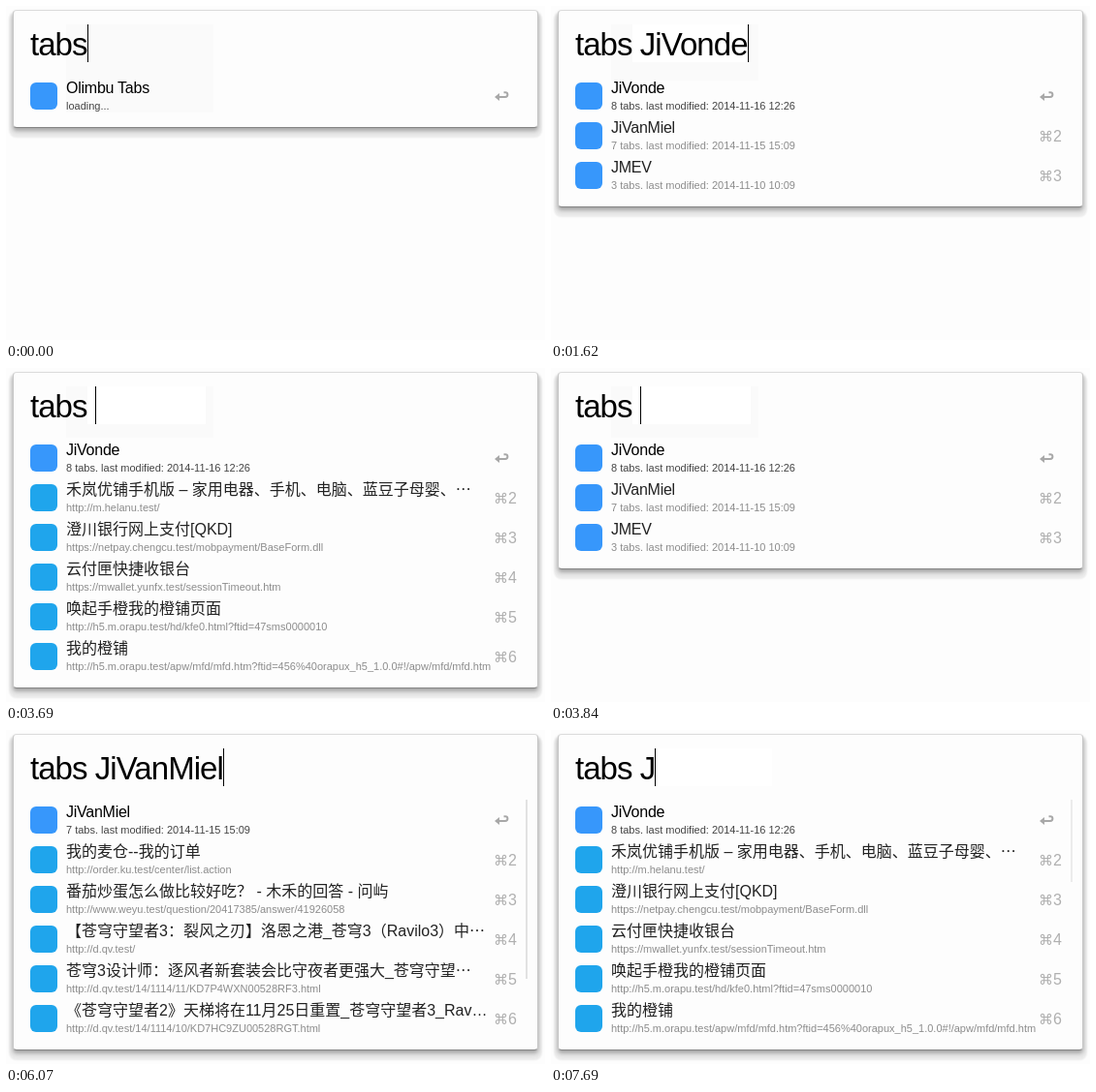
Animation of 556x345 px, one loop 8000 ms. Source, as an HTML page:

```html
<!DOCTYPE html>
<html lang="zh-CN">
<head>
<meta charset="utf-8">
<title>Tab launcher</title>
<style>
html, body { margin: 0; width: 100%; height: 100%; overflow: hidden; background: #fdfdfd; }
#stage {
  position: relative; width: 556px; height: 345px; overflow: hidden;
  font-family: "Liberation Sans", "Noto Sans CJK SC", "Noto Sans CJK", sans-serif;
}
#stage div { position: absolute; box-sizing: border-box; white-space: pre; }
#panel {
  left: 7px; top: 4px; width: 542px; border: 1px solid #c8c8c8;
  border-top-color: #dcdcdc; border-bottom-color: #858585; border-radius: 4px; background: #fdfdfd;
  box-shadow: 0 3px 4px rgba(0,0,0,.3), 0 6px 2px 4px rgba(0,0,0,.08);
}
#wash { left: 62px; top: 19px; width: 152px; background: #fafafa; }
#patch { top: 19px; height: 39px; background: #fff; }
#band { left: 18px; top: 73px; width: 520px; height: 81px; background: #f7f7f7; }
#query {
  left: 25px; top: 19px; height: 39px; line-height: 42px;
  font-size: 33px; letter-spacing: -.95px; color: #000;
}
#caret { display: inline-block; width: 1px; height: 39px; vertical-align: top; background: #000; }
#bar { left: 536px; top: 72px; width: 2px; background: #e2e2e2; }
.row { left: 0; width: 556px; height: 41px; }
.icon { left: 25px; top: 6px; width: 28px; height: 28px; border-radius: 6px; background: #1fa5ec; }
.icon.device { background: #3797fb; }
.name { left: 62px; top: 1.5px; line-height: 20px; font-size: 16px; color: #222; }
.device + .name { letter-spacing: -.25px; }
.note { left: 62px; top: 23px; line-height: 14px; font-size: 11px; color: #8c8c8c; }
.key { left: 503px; top: 11px; font-size: 16px; line-height: 20px; color: #b0b0b0; }
.key i { font: normal 15px/20px "DejaVu Sans", sans-serif; }
.row svg { position: absolute; left: 503px; top: 14px; display: none; }
.on .name { color: #000; }
.on .note { color: #444; }
.on .key { display: none; }
.on svg { display: block; }
</style>
</head>
<body>
<div id="stage">
  <div id="panel"></div>
  <div id="wash"></div>
  <div id="patch"></div>
  <div id="band"></div>
  <div id="query"><span id="text"></span><span id="caret"></span></div>
  <div id="rows"></div>
  <div id="bar"></div>
</div>
<script>
const LOOP = 8000;
const $ = id => document.getElementById(id);

const device = (name, note) => ({ name, note, device: true });
const page = (name, note) => ({ name, note });

const phone = device('JiVonde', '8 tabs. last modified: 2014-11-16 12:26');
const tablet = device('JiVanMiel', '7 tabs. last modified: 2014-11-15 15:09');
const laptop = device('JMEV', '3 tabs. last modified: 2014-11-10 10:09');

const lists = {
  loading: [device('Olimbu Tabs', 'loading...')],
  devices: [phone, tablet, laptop],
  phone: [
    phone,
    page('禾岚优铺手机版 – 家用电器、手机、电脑、蓝豆子母婴、⋯', 'http://m.helanu.test/'),
    page('澄川银行网上支付[QKD]', 'https://netpay.chengcu.test/mobpayment/BaseForm.dll'),
    page('云付匣快捷收银台', 'https://mwallet.yunfx.test/sessionTimeout.htm'),
    page('唤起手橙我的橙铺页面', 'http://h5.m.orapu.test/hd/kfe0.html?ftid=47sms0000010'),
    page('我的橙铺', 'http://h5.m.orapu.test/apw/mfd/mfd.htm?ftid=456%40orapux_h5_1.0.0#!/apw/mfd/mfd.htm')
  ],
  tablet: [
    tablet,
    page('我的麦仓--我的订单', 'http://order.ku.test/center/list.action'),
    page('番茄炒蛋怎么做比较好吃？ - 木禾的回答 - 问屿', 'http://www.weyu.test/question/20417385/answer/41926058'),
    page('【苍穹守望者3：裂风之刃】洛恩之港_苍穹3（Ravilo3）中⋯', 'http://d.qv.test/'),
    page('苍穹3设计师：逐风者新套装会比守夜者更强大_苍穹守望⋯', 'http://d.qv.test/14/1114/11/KD7P4WXN00528RF3.html'),
    page('《苍穹守望者2》天梯将在11月25日重置_苍穹守望者3_Rav…', 'http://d.qv.test/14/1114/10/KD7HC9ZU00528RGT.html')
  ]
};

// Each step changes part of the state from its time on.
const steps = [
  [0, { word: '', list: 'loading', sel: 0, caret: 1, bar: 0, fade: 1, wash: 91, patch: null }],
  [140, { list: 'devices', wash: 58 }],
  [580, { caret: 0 }],
  [1180, { caret: 1 }],
  [1620, { word: ' JiVonde', patch: [84, 206] }],
  [1770, { list: 'phone', bar: 165, wash: 53 }],
  [2220, { caret: 0 }],
  [2520, { caret: 1 }],
  ...erase(' JiVonde', [2520, 2660, 2810, 2960, 3100, 3250]),
  [3400, { fade: .5 }],
  [3540, { fade: 0 }],
  [3690, { word: ' ' }],
  [3840, { list: 'devices', bar: 0 }],
  [4290, { caret: 0 }],
  [4440, { sel: 1 }],
  [4880, { caret: 1 }],
  [5030, { word: ' JiVanMiel', list: 'tablet', sel: 0, bar: 185, fade: 1, wash: 0, patch: null }],
  [5470, { caret: 0 }],
  [6070, { caret: 1 }],
  [6220, { patch: [109, 228] }],
  ...erase(' JiVanMiel', [6220, 6370, 6510, 6800, 6950, 7100, 7250, 7400]),
  [6800, { fade: .5 }],
  [6950, { fade: 0 }],
  [7540, { list: 'phone', bar: 85, fade: 1 }],
  [7690, { fade: .6 }]
].sort((a, b) => a[0] - b[0]);

function erase(word, times) {
  return times.map((t, i) => [t, { word: word.slice(0, -1 - i) }]);
}

function add(parent, cls, text = '') {
  const el = document.createElement('div');
  el.className = cls;
  el.textContent = text;
  return parent.appendChild(el);
}

const arrow = `<svg width="16" height="13" fill="none" stroke="#a8a8a8" stroke-width="2">
<path d="M4 7H12A2.4 2.4 0 0 0 12 2.2H10.5"/><path d="M6 3V11L1 7Z" fill="#a8a8a8" stroke="none"/></svg>`;

function buildRow(box, item, i) {
  const row = add(box, 'row');
  row.style.top = 73 + 41 * i + 'px';
  add(row, item.device ? 'icon device' : 'icon');
  add(row, 'name', item.name);
  add(row, 'note', item.note);
  add(row, 'key').innerHTML = `<i>⌘</i>${i + 1}`;
  row.insertAdjacentHTML('beforeend', arrow);
  return row;
}

const views = {};
for (const id in lists) {
  const box = add($('rows'), 'list');
  views[id] = { box, rows: lists[id].map((item, i) => buildRow(box, item, i)) };
}

function show(s) {
  $('text').textContent = 'tabs' + s.word;
  $('caret').style.opacity = s.caret;
  for (const id in views) views[id].box.style.display = id === s.list ? 'block' : 'none';
  const { rows } = views[s.list];
  rows.forEach((row, i) => row.classList.toggle('on', i === s.sel));
  $('panel').style.height = 81 + 41 * rows.length + 'px';
  $('wash').style.height = s.wash + 'px';
  $('band').style.display = s.sel ? 'block' : 'none';
  const [left, right] = s.patch || [0, 0];
  $('patch').style.left = left + 'px';
  $('patch').style.width = right - left + 'px';
  $('bar').style.height = s.bar + 'px';
  $('bar').style.opacity = s.fade;
}

let shown = 0;
const start = performance.now();
function tick() {
  const t = (performance.now() - start) % LOOP;
  const past = steps.filter(([at]) => at <= t);
  if (past.length !== shown) {
    shown = past.length;
    show(Object.assign({}, ...past.map(([, change]) => change)));
  }
  requestAnimationFrame(tick);
}
tick();
</script>
</body>
</html>
```
